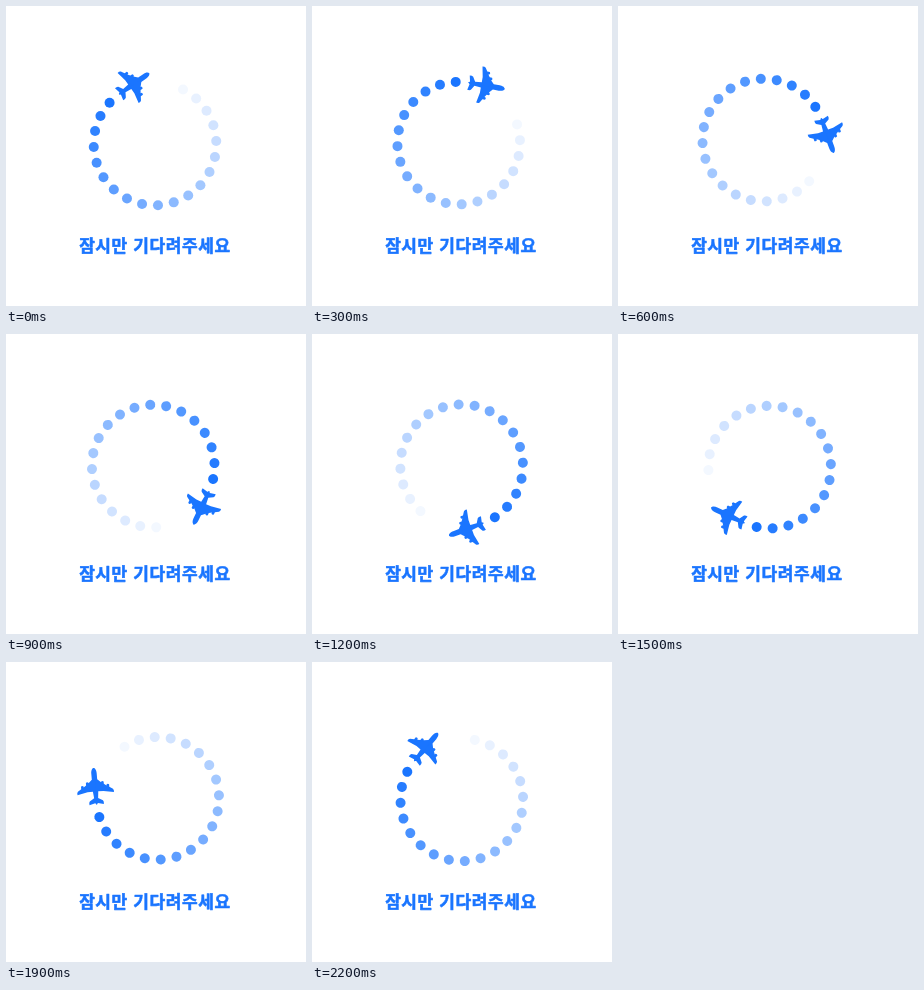
Animation of 300x300 px, one loop 2300 ms. Source, as an HTML page:

```html
<!DOCTYPE html>
<html lang="ko">
<head>
<meta charset="utf-8">
<title>잠시만 기다려주세요</title>
<style>
  html, body { margin: 0; width: 100%; height: 100%; overflow: hidden; background: #fff; }
  svg { display: block; width: 100vw; height: 100vh; fill: #1a75ff; }
  text {
    font: 700 17px "Noto Sans CJK KR", "Noto Sans CJK JP", "Noto Sans CJK", sans-serif;
    letter-spacing: .6px;
    text-anchor: middle;
    stroke: #1a75ff;
    stroke-width: .6;
    stroke-linejoin: round;
  }
</style>
</head>
<body>
<svg viewBox="0 0 300 300">
  <defs>
    <path id="half" d="M-.5 -19.4 H0 C1.7 -19.4 2.7 -16.5 2.7 -14 V-8
      L6.3 -4.6 V-5.2 Q7.6 -6.4 8.9 -5.2 V-2.8
      L11.5 -1 V-2 Q12.8 -3.2 14.1 -2 V.6
      L17.6 2.8 Q18.8 4 18.3 6.2 L8 4.2 L2.7 4.2
      L2 10.8 L6.6 13.6 Q7.7 14.8 7.2 17.2 L1.4 15.9 L0 17.2 H-.5 Z"/>
  </defs>
  <g id="ring">
    <g id="dots"></g>
    <g transform="translate(127.2 78.4) rotate(55)">
      <use href="#half"/>
      <use href="#half" transform="scale(-1 1)"/>
    </g>
  </g>
  <text x="148.9" y="246.1">잠시만 기다려주세요</text>
</svg>
<script>
  const LOOP = 2300, FRAME = 100, STEP = 15, DOTS = 20;
  const pivot = [148.9, 134.8];
  const circle = { x: 149, y: 138, r: 61.3 };
  const ring = document.getElementById('ring');
  const dots = document.getElementById('dots');

  // The trail runs clockwise from palest to solid.
  for (let i = 0; i < DOTS; i++) {
    const a = (STEP * i - 62.8) * Math.PI / 180;
    const dot = document.createElementNS('http://www.w3.org/2000/svg', 'circle');
    dot.setAttribute('cx', circle.x + circle.r * Math.cos(a));
    dot.setAttribute('cy', circle.y + circle.r * Math.sin(a));
    dot.setAttribute('r', 5);
    dot.setAttribute('fill-opacity', (i + 1) / DOTS);
    dots.append(dot);
  }

  function draw(now) {
    const n = Math.floor(now % LOOP / FRAME);
    // 24 positions in 23 ticks: one is skipped.
    const turn = STEP * (n > 4 ? n + 1 : n);
    ring.setAttribute('transform', `rotate(${turn} ${pivot})`);
  }

  const start = performance.now();
  function tick() {
    draw(performance.now() - start);
    requestAnimationFrame(tick);
  }
  tick();
</script>
</body>
</html>
```
